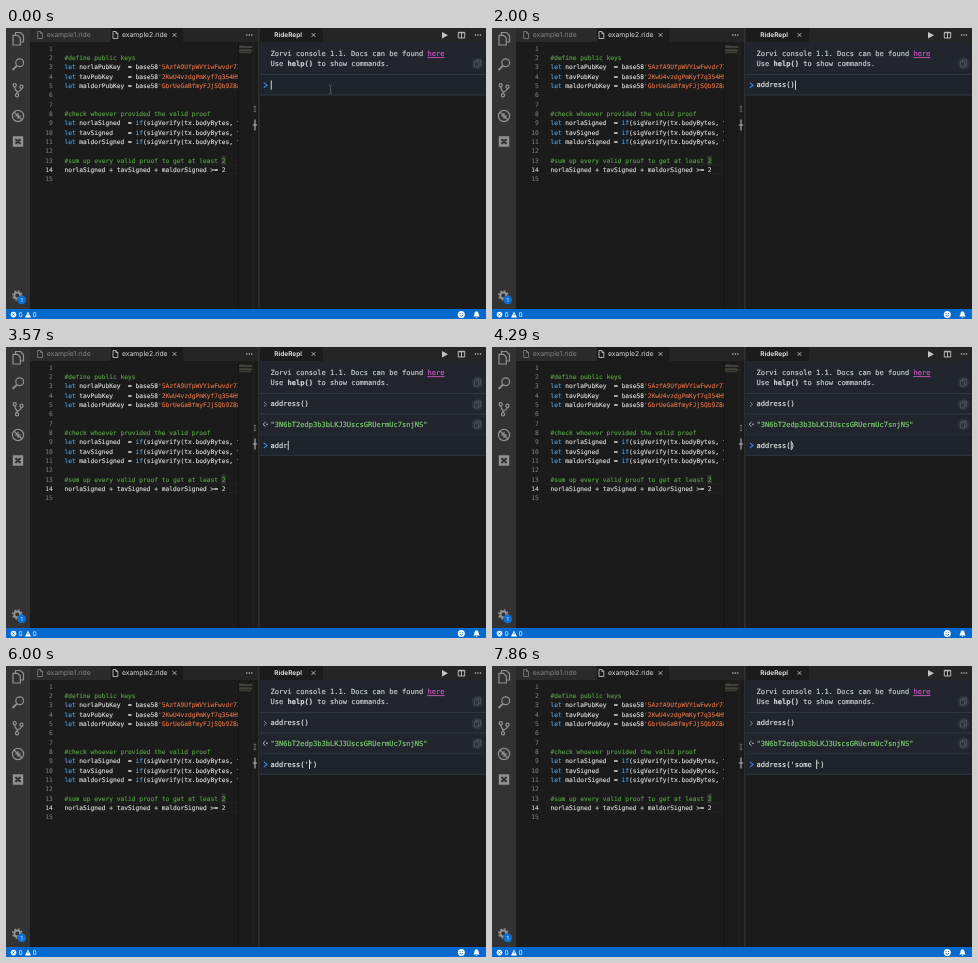
Recreate the animation shown at these times as an HTML page. Size 480 by 291 pixels, loop 8 s.

```html
<!DOCTYPE html>
<html lang="en">
<head>
<meta charset="utf-8">
<title>Console session</title>
<style>
html, body { margin: 0; width: 100%; height: 100%; overflow: hidden; background: #1b1b1b; }
svg { display: block; width: 100vw; height: 100vh; }
text { white-space: pre; text-rendering: geometricPrecision; }
.code, .repl text { fill: currentColor; stroke: currentColor; stroke-width: .14; }
.code { font: 6.22px "DejaVu Sans Mono", monospace; color: #dedede; }
.repl { font: 7.05px "DejaVu Sans Mono", monospace; color: #d3d6db; }
.ui { font: 6.8px Inter, sans-serif; }
.line { fill: none; stroke: #929292; stroke-width: 1.2; }
.glyph { fill: none; stroke: #c5c5c5; stroke-width: .9; }
.border { stroke: #353b46; stroke-width: .8; }
</style>
</head>
<body>
<svg viewBox="0 0 480 291">
  <defs>
    <clipPath id="codeClip"><rect x="24" y="14" width="208" height="267"/></clipPath>
    <g id="copy">
      <circle r="6" fill="#2d3139"/>
      <path d="M-1.3-1.8V-3.4H3V2H1.3M-3-1.8H1.3V3.5H-3Z" fill="none" stroke="#555b64" stroke-width=".8"/>
    </g>
    <path id="file" d="M-2.3-3.5H.6L2.5-1.5V3.5H-2.3ZM.6-3.5V-1.5H2.5" fill="none" stroke-width=".8"/>
    <path id="split" class="glyph" d="M-3.2-2.7H3.2V3H-3.2ZM0-2.7V3M-3.2-2.2H3.2"/>
    <g id="dots" fill="#c5c5c5">
      <circle cx="-2.5" r=".75"/><circle r=".75"/><circle cx="2.5" r=".75"/>
    </g>
    <path id="close" class="glyph" d="M-1.8-1.8L1.8 1.8M1.8-1.8L-1.8 1.8"/>
  </defs>

  <rect width="480" height="291" fill="#1b1b1b"/>
  <rect x="24" width="456" height="14" fill="#252526"/>
  <rect x="24" width="80.5" height="14" fill="#2b2b2b"/>
  <rect x="105" width="72" height="14" fill="#1b1b1b"/>
  <rect x="253" width="64" height="14" fill="#1b1b1b"/>
  <g class="ui">
    <text x="40.7" y="9.4" fill="#858585">example1.ride</text>
    <text x="116" y="9.4" fill="#d8d8d8">example2.ride</text>
    <text x="268.3" y="9.4" fill="#eee" style="font-size:6.5px;font-weight:600">RideRepl</text>
  </g>
  <use href="#file" x="34" y="7" stroke="#858585"/>
  <use href="#file" x="109.3" y="7" stroke="#d0d0d0"/>
  <use href="#close" x="168.5" y="7"/>
  <use href="#close" x="307.5" y="7"/>
  <use href="#dots" x="243.3" y="7"/>
  <path d="M436 4L442 7.2L436 10.4Z" fill="#c5c5c5"/>
  <use href="#split" x="455.5" y="7"/>
  <use href="#dots" x="472" y="7"/>

  <rect width="24" height="281" fill="#333"/>
  <g class="line">
    <path d="M9.5 7V4.5H14.5L17.5 7.5V14H14.5M7 7.3H11.5L14.3 10V17H7Z"/>
    <circle cx="13.7" cy="34.7" r="3.9"/><path d="M11 37.7L6.5 42" stroke-width="1.8"/>
    <circle cx="8.7" cy="57.2" r="1.6"/><circle cx="15.5" cy="58.7" r="1.6"/><circle cx="11" cy="67.3" r="1.6"/>
    <path d="M8.7 58.8Q8.7 61.5 11 63.5V65.7M15.5 60.3Q15.3 62.5 11 64.5"/>
    <circle cx="12" cy="88" r="5.6"/><path d="M8 84L16 92M9 88H15M12 85V91"/>
    <path d="M8 109.5H16V117.5H8Z" stroke-width="2.4"/>
    <path d="M12 109V112M12 115V118M8 113.5H10.5M13.5 113.5H16"/>
    <circle cx="11.3" cy="267.5" r="3" stroke-width="2"/>
    <circle cx="11.3" cy="267.5" r="4.6" stroke-width="1.4" stroke-dasharray="1.8 1.81"/>
  </g>
  <circle cx="15.7" cy="271.8" r="4.4" fill="#0a6fd0"/>
  <text class="ui" x="15.7" y="273.8" text-anchor="middle" fill="#fff" style="font-size:5.5px">1</text>

  <path d="M53 137H232M53 145.8H232" stroke="#272727" stroke-width=".6"/>
  <rect x="215.4" y="127.8" width="4.4" height="9" fill="#353535"/>
  <g id="code" class="code" clip-path="url(#codeClip)"></g>
  <g id="minimap" stroke-width=".4"></g>
  <path d="M232.3 14V281" stroke="#121212" stroke-width=".7"/>
  <path d="M247.3 14V281" stroke="#2c2c2c" stroke-width=".6"/>
  <rect x="252.4" width="1" height="281" fill="#3c3c3c"/>
  <path d="M249 78V84M247.8 78.3H250.2M247.8 83.7H250.2" stroke="#777" stroke-width=".8"/>
  <path d="M249 91.5V102.5M246.8 97H251.2" fill="none" stroke="#b5b5b5" stroke-width="1.1"/>

  <g class="repl">
    <rect x="253.4" y="14" width="226.6" height="32.5" fill="#22252d"/>
    <text x="264.5" y="28.3">Zorvi console 1.1. Docs can be found <tspan color="#d45bc9" text-decoration="underline">here</tspan></text>
    <text x="264.5" y="38.2">Use <tspan font-weight="700">help()</tspan> to show commands.</text>
    <use href="#copy" x="471.4" y="35.5"/>
    <path class="border" d="M253.4 46.5H480"/>
    <g id="history">
      <rect x="253.4" y="47" width="226.6" height="41.5" fill="#22252d"/>
      <path d="M258 55L260.5 57.3L258 59.6" fill="none" stroke="#8b929d" stroke-width=".9"/>
      <text x="264.5" y="59.3" color="#e8eaee">address()</text>
      <use href="#copy" x="471.4" y="57.5"/>
      <path class="border" d="M253.4 67H480M253.4 88.2H480"/>
      <path d="M259.5 75L257 77.3L259.5 79.6" fill="none" stroke="#c8ccd2" stroke-width=".9"/>
      <circle cx="261" cy="77.3" r=".8" fill="#c8ccd2"/>
      <text x="264.5" y="79.8" color="#80d574">"3N6bT2edp3b3bLKJ3UscsGRUermUc7snjNS"</text>
      <use href="#copy" x="471.4" y="77.5"/>
    </g>
    <g id="input">
      <rect x="253.4" y="47" width="226.6" height="20" fill="#1f232b"/>
      <path class="border" d="M253.4 67H480"/>
      <path d="M257.8 54.6L261 57.2L257.8 59.8" fill="none" stroke="#3b82d6" stroke-width="1.2"/>
      <text id="typed" x="264.5" y="59.3" color="#f0f1f3"></text>
      <rect id="caret" y="52.5" width=".9" height="9.2" fill="#e4e4e4"/>
    </g>
  </g>
  <path id="pointer" d="M322.8 56.8Q324.5 57 324.5 58.3Q324.5 57 326.2 56.8M324.5 58V65M322.8 66.2Q324.5 66 324.5 64.7Q324.5 66 326.2 66.2M323.3 61.8H325.7" fill="none" stroke="#565a61" stroke-width=".8"/>

  <rect y="281" width="480" height="10" fill="#0569cd"/>
  <g fill="#fff">
    <circle cx="7.5" cy="286.6" r="2.8"/>
    <path d="M22 283.6L25 289.4H19Z"/>
    <circle cx="455.3" cy="286.5" r="3.5"/>
    <path d="M467.3 288.5Q468.4 287.4 468.4 285.7Q468.5 283.7 470.5 283.3Q472.5 283.7 472.6 285.7Q472.6 287.4 473.7 288.5ZM469.6 289H471.4L470.5 290Z"/>
  </g>
  <path d="M6.4 285.5L8.6 287.7M8.6 285.5L6.4 287.7M22 285.6V287.5M453.5 287.2Q455.3 289.4 457.1 287.2M454 285V286M456.6 285V286" fill="none" stroke="#0569cd" stroke-width=".8"/>
  <g class="ui" fill="#fff" style="font-size:6.6px">
    <text x="12.5" y="289.1">0</text><text x="26.6" y="289.1">0</text>
  </g>
</svg>
<script>
const LOOP = 8000, ENTER = 2140;
const TEXT_X = 264.5, ADVANCE = 7.05 * 0.602, ROW = 41.3;
const $ = id => document.getElementById(id);

const lines = {
  2: "#define public keys",
  3: "let norlaPubKey  = base58'5AzfA9UfpWVYiwFwvdr77",
  4: "let tavPubKey    = base58'2KwU4vzdgPmKyf7q354H9",
  5: "let maldorPubKey = base58'GbrUeGaBfmyFJjSQb9Z8a",
  8: "#check whoever provided the valid proof",
  9: "let norlaSigned  = if(sigVerify(tx.bodyBytes, t",
  10: "let tavSigned    = if(sigVerify(tx.bodyBytes, t",
  11: "let maldorSigned = if(sigVerify(tx.bodyBytes, t",
  13: "#sum up every valid proof to get at least 2",
  14: "norlaSigned + tavSigned + maldorSigned >= 2"
};

const paint = (color, s) => `<tspan color="${color}">${s}</tspan>`;
const highlight = s => s[0] === "#" ? paint("#57a245", s)
  : s.replace(/\b(?:let|if)\b|'.*/g, m => paint(m[0] === "'" ? "#dc7045" : "#4f9fe0", m));

let codeMarkup = "";
for (let n = 1; n <= 15; n++) {
  const y = 22.8 + 9.33 * (n - 1);
  codeMarkup += `<text x="46.7" y="${y}" text-anchor="end" color="${n === 14 ? "#c6c6c6" : "#747474"}">${n}</text>`;
  if (lines[n]) codeMarkup += `<text x="58.4" y="${y}">${highlight(lines[n])}</text>`;
}
$("code").innerHTML = codeMarkup;

$("minimap").innerHTML = Object.entries(lines).map(([n, s]) =>
  `<path d="M233 ${16.5 + n * 0.6}h${s.length * 0.28}" stroke="${s[0] === "#" ? "#3c5f35" : "#6b6661"}"/>`).join("");

// Each key: [time, text, caret column]
const keys = [[0, "", 0]];
const type = (text, times) => times.forEach((t, i) => keys.push([t, text.slice(0, i + 1), i + 1]));
type("address", [140, 290, 430, 570, 710, 860, 1000]);
keys.push([1140, "address()", 8], [1290, "address()", 9], [ENTER, "", 0]);
type("address", [3140, 3290, 3430, 3570, 3710, 4000, 4100]);
keys.push([4140, "address()", 8], [6000, "address('')", 9]);
[7140, 7430, 7570, 7710, 7860].forEach((t, i) =>
  keys.push([t, `address('${"some ".slice(0, i + 1)}')`, 10 + i]));

const blinks = [[1710, 2000], [2570, 3000], [4570, 5000], [5570, 6000], [6570, 7000]];

function render(t) {
  const [, text, column] = keys.filter(k => k[0] <= t).pop();
  const entered = t >= ENTER;
  const hidden = blinks.some(([off, on]) => t >= off && t < on);
  $("typed").textContent = text;
  $("caret").setAttribute("x", TEXT_X + 0.3 + column * ADVANCE);
  $("caret").style.display = hidden ? "none" : "";
  $("history").style.display = entered ? "" : "none";
  $("input").setAttribute("transform", `translate(0 ${entered ? ROW : 0})`);
  $("pointer").style.display = t < 140 ? "" : "none";
}

const start = performance.now();
function tick() {
  render((performance.now() - start) % LOOP);
  requestAnimationFrame(tick);
}
tick();
</script>
</body>
</html>
```
